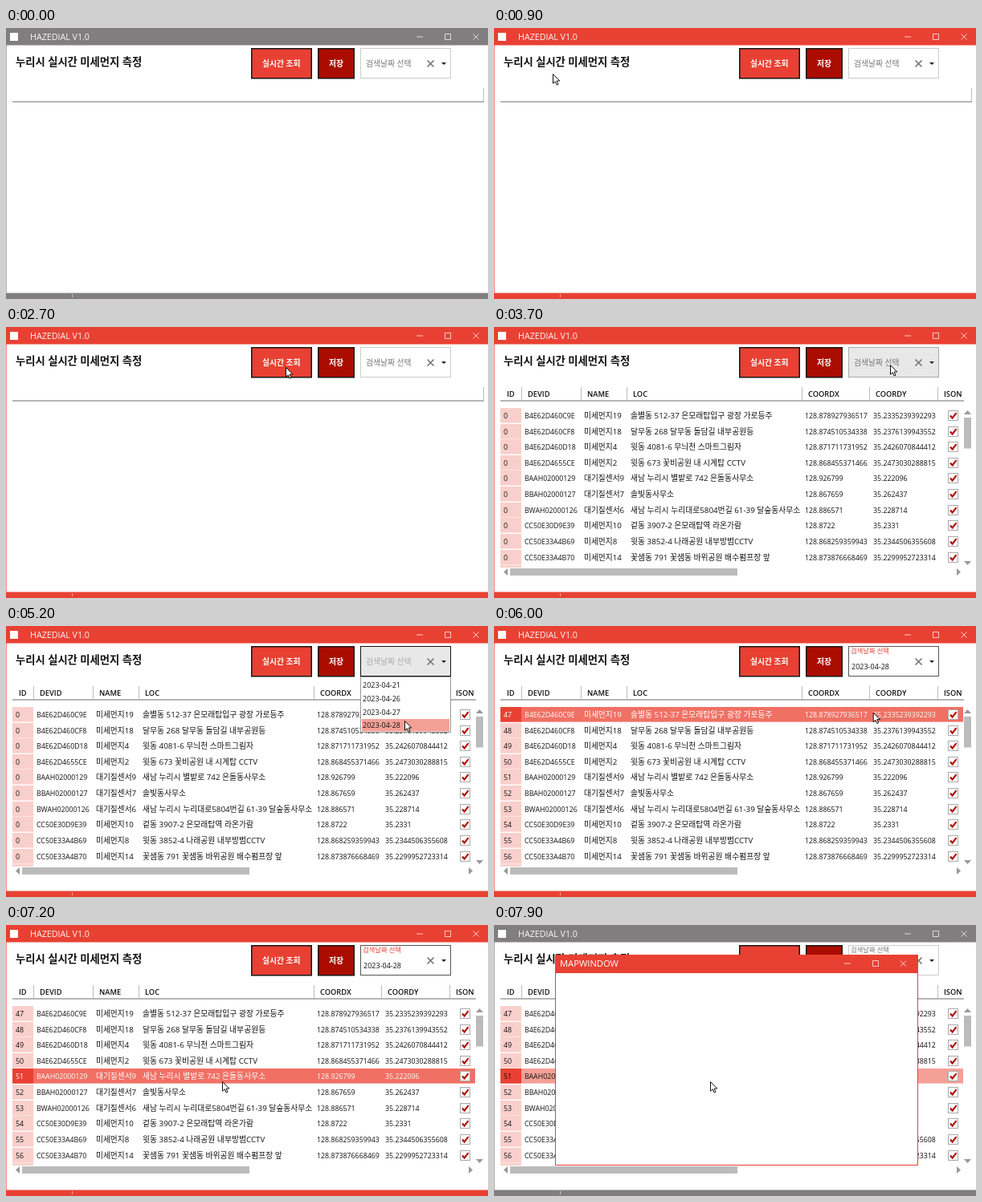
These frames come from a looping animation (600x338 px, 8000 ms). An HTML page:

```html
<!DOCTYPE html>
<html lang="ko">
<head>
<meta charset="utf-8">
<style>
html, body { margin: 0; width: 100%; height: 100%; overflow: hidden; background: #fff; }
svg { display: block; width: 600px; height: 338px; }
text { font-family: "Open Sans", "Noto Sans CJK KR", "Noto Sans CJK", sans-serif; white-space: pre; }
</style>
</head>
<body>
<svg id="stage" viewBox="0 0 600 338"></svg>
<script>
const LOOP = 8000, STEP = 100;
const RED = '#e84133', DARK = '#aa0d00', GRAY = '#807e7e', PALE = '#f4a097', HOT = '#f07064', INK = '#111';
const ROW_TOP = 101, ROW_H = 19.62;

// Moments at which the interface changes
const AT = { active: 500, saveOn: 1850, saveOff: 2150, loaded: 3000, open: 4200, picked: 5600, map: 7600 };

// Pointer path: time, x, y
const PATH = [
  [400, 62, 330], [900, 73, 57], [1300, 190, 31], [1800, 377, 45], [1900, 437, 54],
  [2100, 430, 56], [2500, 348, 50], [3100, 348, 50], [3700, 493, 47], [4200, 494, 47],
  [4500, 495, 68], [5200, 496, 118], [5800, 497, 121], [6300, 425, 83], [6500, 310, 113],
  [6800, 286, 275], [7100, 269, 195], [8000, 269, 195]
];

const COLUMNS = [['ID', 16], ['DEVID', 42], ['NAME', 116], ['LOC', 173], ['COORDX', 391], ['COORDY', 475], ['ISON', 560]];
const DATES = ['2023-04-21', '2023-04-26', '2023-04-27', '2023-04-28'];
const ROWS = [
  'B4E62D460C9E|미세먼지19|솔별동 512-37 은모래탑입구 광장 가로등주|128.878927936517|35.2335239392293',
  'B4E62D460CF8|미세먼지18|달무동 268 달무동 돌담길 내부공원등|128.874510534338|35.2376139943552',
  'B4E62D460D18|미세먼지4|윗동 4081-6 무늬천 스마트그림자|128.871711731952|35.2426070844412',
  'B4E62D4655CE|미세먼지2|윗동 673 꽃비공원 내 시계탑 CCTV|128.868455371466|35.2473030288815',
  'BAAH02000129|대기질센서9|새남 누리시 별밭로 742 은돌동사무소|128.926799|35.222096',
  'BBAH02000127|대기질센서7|솔빛동사무소|128.867659|35.262437',
  'BWAH02000126|대기질센서6|새남 누리시 누리대로5804번길 61-39 달숲동사무소|128.886571|35.228714',
  'CC50E30D9E39|미세먼지10|겉동 3907-2 은모래탑역 라온가람|128.8722|35.2331',
  'CC50E33A4B69|미세먼지8|윗동 3852-4 나래공원 내부방범CCTV|128.868259359943|35.2344506355608',
  'CC50E33A4B70|미세먼지14|꽃샘동 791 꽃샘동 바위공원 배수펌프장 앞|128.873876668469|35.2299952723314'
].map(line => line.split('|'));

const rect = (x, y, w, h, fill, extra = '') =>
  `<rect x="${x}" y="${y}" width="${w}" height="${h}" fill="${fill}" ${extra}/>`;
const text = (s, x, y, size, fill = INK, extra = '') =>
  `<text x="${x}" y="${y}" font-size="${size}" fill="${fill}" ${extra}>${s}</text>`;
const line = (d, stroke, width = 1) =>
  `<path d="${d}" fill="none" stroke="${stroke}" stroke-width="${width}"/>`;
const shape = (d, fill) => `<path d="${d}" fill="${fill}"/>`;
const BOLD = 'font-weight="700"';
const SEMI = 'font-weight="600"';

function pointer(t) {
  if (t < PATH[0][0]) return null;
  const i = PATH.findIndex(p => p[0] > t);
  const [t0, x0, y0] = PATH[i - 1], [t1, x1, y1] = PATH[i];
  const k = (t - t0) / (t1 - t0), e = k * k * (3 - 2 * k);
  return { x: x0 + (x1 - x0) * e, y: y0 + (y1 - y0) * e };
}

const arrow = ({ x, y }) => `<path transform="translate(${x.toFixed(1)} ${y.toFixed(1)})"
  d="M.5 .5V12.2L3.2 9.7L5.2 14L7 13.2L5.1 9H8.8Z" fill="#fff" stroke="#111" stroke-width="1"/>`;

// Minimise, maximise and close glyphs, given the x of each and a centre line
const windowButtons = (a, b, c, y) => line(
  `M${a - 4} ${y}h8M${b - 3.5} ${y - 3.5}h7v7h-7zM${c - 3.5} ${y - 3.5}l7 7m0 -7l-7 7`, '#ffffffcc', .9);

function frame(active) {
  const tone = active ? RED : GRAY;
  return rect(0, 0, 600, 338, '#fff') + rect(0, 0, 600, 21.5, tone) +
    rect(0, 0, .6, 338, tone) + rect(0, 330.5, 600, 7.5, tone) +
    rect(82, 332, 1, 4, '#fff', 'opacity=".55"') +
    rect(5, 6, 10, 10, '#fff') + text('HAZEDIAL V1.0', 30, 15, 10.7, '#fffffff0') +
    windowButtons(515, 550, 585, 11);
}

const button = (label, x, w, tx, fill) =>
  rect(x + .75, 25.75, w - 1.5, 37, fill, 'stroke="#161616" stroke-width="1.5"') +
  text(label, tx, 48, 9.8, '#fff', BOLD);

function combo({ open, picked, hover, active }) {
  const border = open ? '#111' : picked && active ? '#555' : hover ? '#aaa' : '#ccc';
  const fill = open || hover ? '#e8e8e8' : '#fff';
  const label = picked
    ? text('검색날짜 선택', 444, 34, 8.3, active ? RED : '#777') + text(DATES[3], 445, 54, 9)
    : text('검색날짜 선택', 448, 48, 9.8, open ? '#aaa' : '#777');
  return rect(441.5, 25.5, 112, 37, fill, `stroke="${border}"`) + label +
    line('M524.5 40.5l8 8m0 -8l-8 8', '#777', 1.7) + shape('M542 43h6l-3 3z', '#222');
}

function dropdown(p) {
  const hot = Math.floor((p.y - 66) / 16.6);
  return rect(441.5, 63.5, 112, 69, '#fff', 'stroke="#999"') +
    DATES.map((d, i) => (i === hot ? rect(443, 66.2 + i * 16.6, 109, 15.6, PALE) : '') +
      text(d, 444, 77.3 + i * 16.6, 9)).join('');
}

function row(cells, i, { picked, hotRow, active }) {
  const y = Math.round(ROW_TOP + i * ROW_H), base = y + 13, hot = i === hotRow;
  const ink = hot && active ? '#fff' : INK;
  const [id, name, place, cx, cy] = cells;
  return (hot ? rect(8, y, 576, 18.6, active ? HOT : PALE) : '') +
    rect(8, y, 26, 18.6, hot ? RED : '#f9cfcb') +
    text(picked ? 47 + i : 0, 12, base, 8.9, ink) + text(id, 38, base, 8.8, ink) +
    text(name, 112, base, 9.7, ink) + text(place, 170, base, 9.8, ink) +
    text(cx, 387, base, 8.8, ink) + text(cy, 472, base, 8.8, ink) +
    rect(565.5, y + 3.5, 12, 12, '#fff', 'stroke="#aaa"') +
    line(`M568 ${y + 9.5}l2.6 3l5 -6.4`, '#b00d00', 2.1);
}

function table(state) {
  const head = COLUMNS.map(([s, x], i) => text(s, x, 87, 9.3, INK, SEMI) +
    (i ? rect(x - 8, 75, 1, 17, '#bbb') : '')).join('');
  return head + rect(8, 91, 577, 2, '#b5b5b5') +
    ROWS.map((cells, i) => row(cells, i, state)).join('') +
    rect(8, ROW_TOP + 10 * ROW_H, 26, 2.8, '#f9cfcb') +
    rect(585, 113, 9, 38.5, '#bbb') + rect(20, 301, 283, 9, '#bbb') +
    shape('M585 109h9l-4.5 -5zM585 292h9l-4.5 5zM17 301v9l-5 -4.5zM576 301v9l5 -4.5z', '#999');
}

const emptyGrid = () => rect(8, 91, 587, 2, '#b5b5b5') + rect(594, 75, 1, 17, '#bbb');

const mapWindow = () =>
  rect(76.5, 37.5, 451, 262, '#fff', `stroke="${RED}"`) + rect(76, 37, 452, 23, RED) +
  text('MAPWINDOW', 82, 52, 11.2, '#fff') + windowButtons(440, 475, 509.5, 48);

function scene(t) {
  const p = pointer(t);
  const loaded = t >= AT.loaded, picked = t >= AT.picked, map = t >= AT.map;
  const open = t >= AT.open && !picked;
  const active = t >= AT.active && !map;
  const hover = p && p.x > 441 && p.x < 554 && p.y > 25 && p.y < 63;
  const index = p && !open ? Math.floor((p.y - ROW_TOP) / ROW_H) : -1;
  const hotRow = index < ROWS.length ? index : -1;
  const state = { open, picked, hover, active, hotRow };
  const saveHot = t >= AT.saveOn && t < AT.saveOff;
  return frame(active) +
    text('누리시 실시간 미세먼지 측정', 12, 46.5, 13.3, '#111', SEMI) +
    button('실시간 조회', 305, 76, 319, RED) +
    button('저장', 388, 46, 402, saveHot ? RED : DARK) +
    combo(state) + (loaded ? table(state) : emptyGrid()) +
    (open ? dropdown(p) : '') + (map ? mapWindow() : '') + (p ? arrow(p) : '');
}

const stage = document.getElementById('stage');
const start = performance.now();
let shown = -1;

function tick() {
  const t = Math.floor((performance.now() - start) % LOOP / STEP) * STEP;
  if (t !== shown) stage.innerHTML = scene(shown = t);
  requestAnimationFrame(tick);
}
tick();
</script>
</body>
</html>
```
